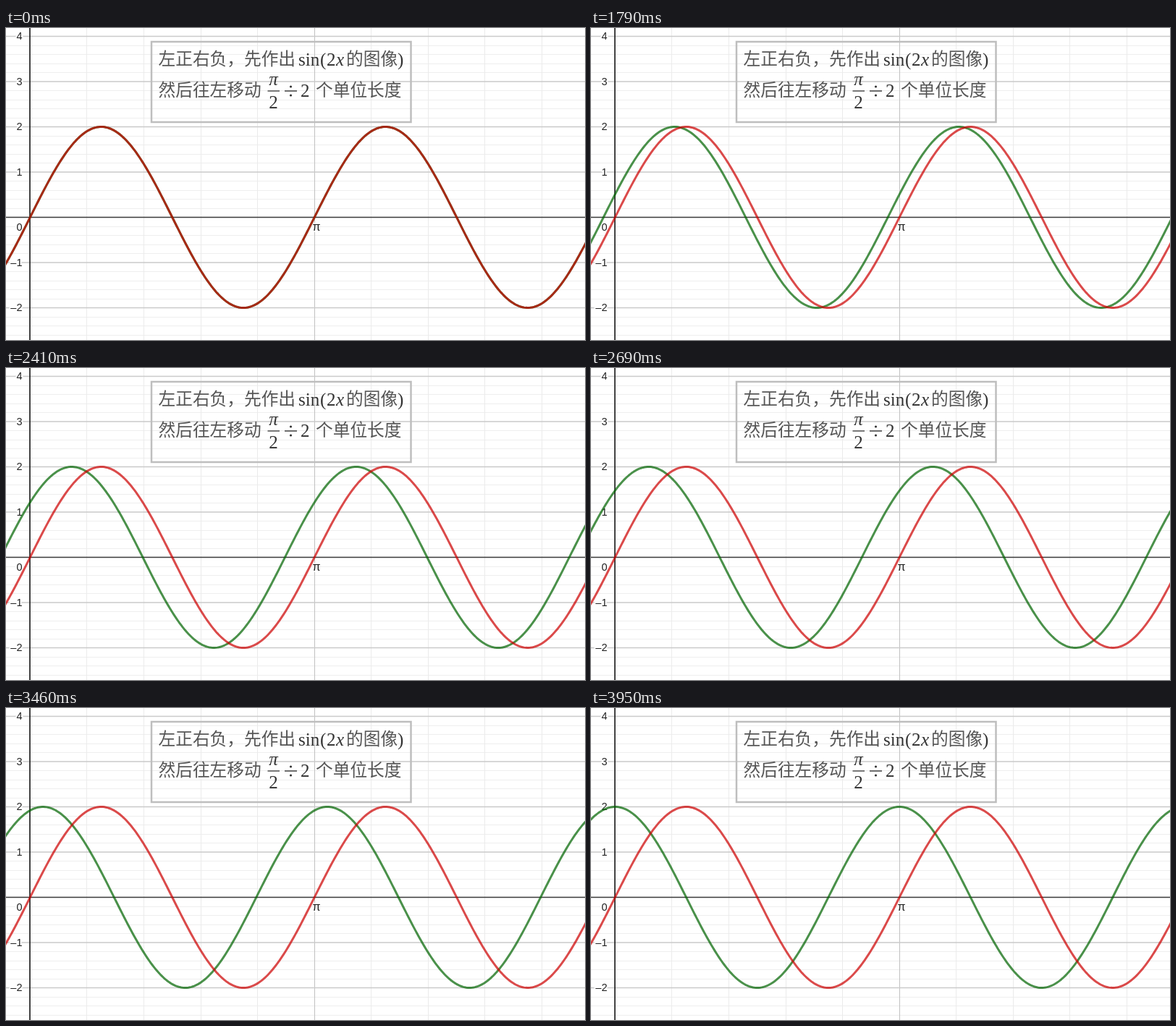
Recreate the animation shown at these times as an HTML page with a canvas. Size 800 by 431 pixels, loop 7020 ms.

```html
<!DOCTYPE html>
<html lang="zh-CN">
<head>
<meta charset="utf-8">
<style>
  html, body { margin: 0; width: 100%; height: 100%; overflow: hidden; background: #fff; }
  canvas { display: block; }
</style>
</head>
<body>
<canvas id="stage" width="800" height="431"></canvas>
<script>
const ctx = document.getElementById('stage').getContext('2d');
const WIDTH = 800, HEIGHT = 431, LOOP = 7020;
const ORIGIN = { x: 33.3, y: 261.5 };
const PI_PX = 392.9, UNIT_PX = 62.5;
const SANS = '"Liberation Sans", Arial, sans-serif';
const CJK = '300 23.7px "Noto Sans CJK SC", "Noto Sans CJK", sans-serif';
const MATH = '25px "Liberation Serif", serif';

// Stretches of stepped motion: start, end, steps, shift in px at both ends
const STRETCHES = [
  [1450, 1520, 1, 1, 4],
  [1520, 2060, 8, 4, 28.1],
  [2060, 2190, 1, 28.1, 32.4],
  [2190, 2690, 7, 32.4, 51.9],
  [2690, 2890, 3, 51.9, 58.8],
  [2890, 2950, 1, 58.8, 60.8],
  [2950, 3180, 3, 60.8, 68.4],
  [3180, 3460, 4, 68.4, 80.4],
  [3460, 3600, 2, 80.4, 85.5],
  [3600, 3670, 1, 85.5, 88],
  [3670, 3950, 4, 88, PI_PX / 4],
];

function shiftAt(time) {
  if (time < 1450) return 0;
  for (const [start, end, steps, from, to] of STRETCHES) {
    if (time < end) {
      const step = Math.floor((time - start) / (end - start) * steps + 1e-6);
      return from + (to - from) * step / steps;
    }
  }
  return PI_PX / 4;
}

function line(x1, y1, x2, y2, color, width) {
  ctx.strokeStyle = color;
  ctx.lineWidth = width;
  ctx.beginPath();
  ctx.moveTo(x1, y1);
  ctx.lineTo(x2, y2);
  ctx.stroke();
}
const horizontal = (y, color, width) => line(0, y, WIDTH, y, color, width);
const vertical = (x, color, width) => line(x, 0, x, HEIGHT, color, width);

function text(string, x, y, font, align = 'left') {
  ctx.font = font;
  ctx.textAlign = align;
  ctx.fillText(string, x, y);
}

function label(string, x, y, align, size = 14.5) {
  ctx.font = size + 'px ' + SANS;
  ctx.textAlign = align;
  ctx.strokeStyle = '#fff';
  ctx.lineWidth = 4;
  ctx.lineJoin = 'round';
  ctx.strokeText(string, x, y);
  ctx.fillStyle = '#222';
  ctx.fillText(string, x, y);
}

function drawPlane() {
  ctx.fillStyle = '#fff';
  ctx.fillRect(0, 0, WIDTH, HEIGHT);
  for (let i = -13; i <= 20; i++) {
    if (i % 5) horizontal(Math.floor(ORIGIN.y - i * UNIT_PX / 5) + 0.5, '#eeeeee', 1);
  }
  for (let i = 1; i < 10; i++) {
    vertical(Math.floor(ORIGIN.x + i * PI_PX / 5) + 0.5, i === 5 ? '#c0c0c0' : '#ebebeb', 1);
  }
  for (let i = -2; i <= 4; i++) {
    if (i) horizontal(ORIGIN.y - i * UNIT_PX, '#cacaca', 1.7);
  }
  horizontal(ORIGIN.y, '#3a3a3a', 1.6);
  vertical(33, '#222', 1.7);
  for (let i = -2; i <= 4; i++) {
    if (i) label(String(i).replace('-', '–'), 22.5, ORIGIN.y - i * UNIT_PX + 4.5, 'right');
  }
  label('0', 22.5, 280, 'right');
  label('π', 429, 280, 'center', 16);
}

function drawNote() {
  ctx.strokeStyle = '#bebebe';
  ctx.lineWidth = 2.5;
  ctx.lineJoin = 'miter';
  ctx.strokeRect(201, 19, 358.5, 111);

  ctx.fillStyle = '#555';
  text('左正右负，先作出', 210.5, 51, CJK);
  text('的图像', 470, 51, CJK);
  text('然后往左移动', 210.5, 94, CJK);
  text('个单位长度', 428, 94, CJK);

  ctx.fillStyle = '#333';
  text('sin', 404, 52, MATH);
  text('(', 434, 52, MATH);
  text('2', 443, 52, MATH);
  text('x', 456, 52, 'italic ' + MATH);
  text(')', 541, 52, MATH);
  text('π', 369.5, 79, 'italic ' + MATH, 'center');
  text('2', 369.5, 111, MATH, 'center');
  line(361.5, 87, 378, 87, '#333', 1.3);
  line(385, 87, 402, 87, '#333', 1.4);
  for (const y of [81, 93]) {
    ctx.beginPath();
    ctx.arc(393.5, y, 1.6, 0, 2 * Math.PI);
    ctx.fill();
  }
  text('2', 407, 95, MATH);
}

function drawWave(shift, color) {
  ctx.strokeStyle = color;
  ctx.lineWidth = 3;
  ctx.lineJoin = 'round';
  ctx.beginPath();
  for (let x = -4; x <= WIDTH + 4; x += 2) {
    const angle = 2 * Math.PI * (x - ORIGIN.x + shift) / PI_PX;
    ctx.lineTo(x, ORIGIN.y - 2 * UNIT_PX * Math.sin(angle));
  }
  ctx.stroke();
}

function render() {
  drawPlane();
  drawNote();
  drawWave(shiftAt(performance.now() % LOOP), 'rgba(0, 100, 0, 0.71)');
  drawWave(0, 'rgba(204, 0, 0, 0.71)');
  requestAnimationFrame(render);
}
render();
</script>
</body>
</html>
```
